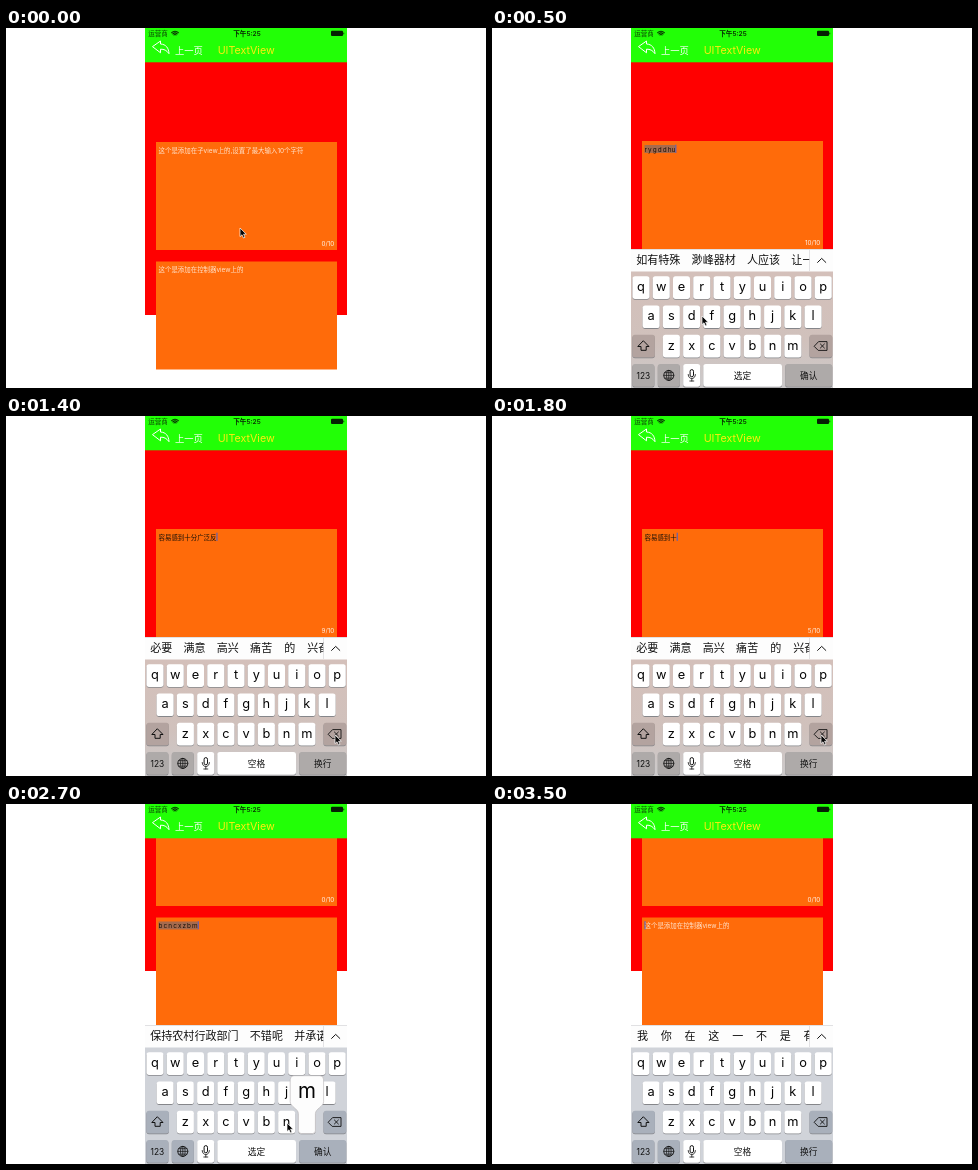
An HTML page for the animation above (3600 ms loop, 480 px wide and 360 px high).

```html
<!DOCTYPE html>
<html lang="zh-CN">
<head>
<meta charset="utf-8">
<title>UITextView</title>
<style>
html, body { margin: 0; width: 100%; height: 100%; overflow: hidden; background: #fff; }
svg { display: block; width: 480px; height: 360px; }
text { font-family: Inter, "Noto Sans CJK SC", "Noto Sans CJK", sans-serif; white-space: pre; }
</style>
</head>
<body>
<svg id="stage" viewBox="0 0 480 360">
  <defs>
    <clipPath id="phone"><rect x="139" width="202" height="360"/></clipPath>
    <clipPath id="bar"><rect x="139" y="221" width="178.5" height="23"/></clipPath>
    <linearGradient id="warm" x2="0" y2="1">
      <stop offset="0" stop-color="#d4c0ba"/>
      <stop offset=".6" stop-color="#d0c1bc"/>
      <stop offset="1" stop-color="#cccacb"/>
    </linearGradient>
  </defs>
</svg>
<script>
const NS = 'http://www.w3.org/2000/svg';
const stage = document.getElementById('stage');

function add(parent, tag, attrs = {}, content) {
  const el = document.createElementNS(NS, tag);
  set(el, attrs);
  if (content !== undefined) el.textContent = content;
  parent.append(el);
  return el;
}
function set(el, attrs) {
  for (const name in attrs) el.setAttribute(name, attrs[name]);
}
const group = (parent, attrs) => add(parent, 'g', attrs);
const rect = (parent, x, y, width, height, fill, rx = 0) =>
  add(parent, 'rect', { x, y, width, height, fill, rx });
const label = (parent, x, y, size, fill, content, anchor = 'start') =>
  add(parent, 'text', { x, y, 'font-size': size, fill, 'text-anchor': anchor }, content);
const line = (parent, d, stroke = '#111', width = 1) =>
  add(parent, 'path', { d, fill: 'none', stroke, 'stroke-width': width,
    'stroke-linecap': 'round', 'stroke-linejoin': 'round' });
const show = (el, on) => set(el, { visibility: on ? 'visible' : 'hidden' });

const phone = group(stage, { 'clip-path': 'url(#phone)' });

// Page content: red panel and two text views
const page = group(phone);
rect(page, 139, 34, 202, 253, '#ff0000');

function makeField(y, hint) {
  rect(page, 150, y, 181, 108, '#ff6b0a');
  const mark = rect(page, 152, y + 4, 0, 8, 'rgba(70,105,150,.48)');
  const placeholder = label(page, 152.5, y + 10.6, 6.45, '#ffe5d0', hint);
  const typed = label(page, 152.5, y + 10.6, 6.45, '#161008', '');
  const caret = rect(page, 152, y + 3.7, 1, 8.2, '#3f61d8');
  return { mark, placeholder, typed, caret };
}
const fields = [
  makeField(114, '这个是添加在子view上的,设置了最大输入10个字符'),
  makeField(233.5, '这个是添加在控制器view上的')
];
const counter = label(page, 328.3, 217.7, 6.3, '#fff0e4', '', 'end');

function fillField(field, text, marked, active) {
  field.typed.textContent = text;
  const start = text ? field.typed.getComputedTextLength() : 0;
  field.typed.textContent = text + marked;
  const end = text + marked ? field.typed.getComputedTextLength() : 0;
  set(field.mark, { x: 152.5 + start, width: end - start });
  set(field.caret, { x: 152.5 + end });
  show(field.caret, active);
  show(field.placeholder, !text && !marked);
}

// Navigation bar
rect(phone, 139, 0, 202, 34.3, '#22ff06');
label(phone, 142.3, 8, 6.5, '#0a3a05', '运营商');
for (const r of [1.4, 3, 4.6]) {
  const k = r * .72;
  line(phone, `M${169 - k} ${8 - k}A${r} ${r} 0 0 1 ${169 + k} ${8 - k}`, '#082c04', 1.1);
}
set(label(phone, 241, 8, 6.6, '#082c04', '下午5:25', 'middle'), { 'font-weight': 600 });
rect(phone, 325, 2.8, 12, 5.2, '#052003', 1);
rect(phone, 337.4, 4.4, .8, 2, '#052003', .4);
line(phone, 'M146.8 18.4L154.5 13V16C160 16.3 162.7 20 163 25.7C160.7 22.3 158 21.1 154.5 21.2V24.4Z', '#fff', 1);
set(label(phone, 169, 26, 9.3, '#fff', '上一页'), { 'font-weight': 300 });
label(phone, 240.2, 26.1, 10.7, '#ffec10', 'UITextView', 'middle');

// Keyboard
const board = group(phone);
const backdrop = rect(board, 139, 243, 202, 117, '#d0d3d9');
rect(board, 139, 221, 202, 22.5, '#fdfdfd');
rect(board, 139, 221, 202, .6, '#cfcfd2');
const words = group(board, { 'clip-path': 'url(#bar)' });
rect(board, 317.3, 222, .6, 21, '#d0d0d3');
line(board, 'M325.6 234.4L329.7 230.4L333.8 234.4');

const darkKeys = [];
function key(x, y, width, dark) {
  rect(board, x, y + .8, width, 22.7, '#85868a', 2.6);
  const face = rect(board, x, y, width, 22.7, '#fff', 2.6);
  if (dark) darkKeys.push(face);
}

const keys = {};
[['qwertyuiop', 149, 248.2], ['asdfghjkl', 159.1, 277.4], ['zxcvbnm', 179.4, 306.7]]
  .forEach(([letters, x, y]) => [...letters].forEach((ch, i) => {
    const cx = x + i * 20.25;
    keys[ch] = { cx, y };
    key(cx - 8.5, y, 17, false);
    label(board, cx, y + 15, 12.8, '#050505', ch, 'middle');
  }));

key(140.4, 306.7, 22.5, true);
line(board, 'M151.6 313L157 318.5H154.2V322.3H149V318.5H146.2Z');
key(317.5, 306.7, 22.7, true);
line(board, 'M322.4 318L326.6 313.6H335V322.4H326.6ZM328.4 316L332.4 320M332.4 316L328.4 320', '#111', .9);

key(140.4, 336, 22, true);
label(board, 151.4, 350.7, 8.4, '#111', '123', 'middle');
key(165.8, 336, 22, true);
add(board, 'circle', { cx: 176.8, cy: 347.4, r: 5, fill: 'none', stroke: '#111', 'stroke-width': .9 });
add(board, 'ellipse', { cx: 176.8, cy: 347.4, rx: 2.3, ry: 5, fill: 'none', stroke: '#111', 'stroke-width': .7 });
line(board, 'M171.8 347.4H181.8M176.8 342.4V352.4M172.7 344.7H180.9M172.7 350.1H180.9', '#111', .7);
key(191.2, 336, 17, false);
rect(board, 198.1, 341.6, 3.4, 7.2, 'none', 1.7).setAttribute('stroke', '#111');
line(board, 'M196.2 346.5C196.2 352 203.4 352 203.4 346.5M199.8 350.7V353M197.8 353H201.8', '#111', .8);
key(211.3, 336, 78.7, false);
const spaceLabel = label(board, 250.4, 350.7, 8.7, '#111', '', 'middle');
key(293.2, 336, 47, true);
const enterLabel = label(board, 316.7, 350.7, 8.7, '#111', '', 'middle');

// Enlarged key; its origin is the top centre of the pressed key
const bubble = group(board);
add(bubble, 'path', {
  d: 'M-13-35H13Q16.7-35 16.7-31V-9C16.7-4 8.5-2 8.5 3V20Q8.5 22.8 5.7 22.8H-5.7Q-8.5 22.8-8.5 20V3C-8.5-2-16.7-4-16.7-9V-31Q-16.7-35-13-35Z',
  fill: '#fdfdfd', stroke: '#b4b1b2', 'stroke-width': .6
});
const bubbleText = label(bubble, 0, -13, 20.5, '#050505', '', 'middle');

const pointer = add(stage, 'path', {
  d: 'M0 0V8.6L2 6.8L3.5 10L5 9.3L3.6 6.2H6.3Z',
  fill: '#050505', stroke: '#fff', 'stroke-width': .7
});

const PICKS = {
  start: '我 你 在 这 一 不 是 有',
  r: '人 让 如 日 入 热 肉 任',
  ryg: '如有 容易 任意 人员 人一个 日用',
  ryd: '容易 任意 如有的 人应 让一',
  full: '如有特殊 渺峰器材 人应该 让一',
  feel: '必要 满意 高兴 痛苦 的 兴奋',
  sf: '是否 身份 十分 省份 释放 师傅',
  f: '发 分 放 风 份 饭 翻 副',
  fg: '法国 反感 风格 覆盖 分管 飞过',
  bc: '不错 保持 报仇 版次 补充 编程',
  bcn: '保持农村 不错呢 并承诺 不曾',
  bcm: '保持农村行政部门 不错呢 并承诺'
};

const LONG = '容易感到十分广泛反感';
const VILLAGE = '保持农村行政部门';
const cut = (text, n) => text.slice(0, n);

// One row per 100 ms: active view, text, composing, picks, pointer x, y, pressed key
const STEPS = [
  [0, '', '', 'start', 234, 200],
  [1, '', '', 'start', 234, 200],
  [1, '', 'r', 'r', 211, 260, 'r'],
  [1, '', 'r y g', 'ryg', 239, 288],
  [1, '', 'r y g d d', 'ryd', 201, 288, 'd'],
  [1, '', 'r y g d d hu', 'full', 210, 288],
  [1, cut(LONG, 4), '', 'feel', 196, 232],
  [1, cut(LONG, 4), 's f', 'sf', 219, 288],
  [1, cut(LONG, 8), '', 'feel', 204, 234],
  [1, cut(LONG, 8), 'f', 'f', 240, 291, 'g'],
  [1, cut(LONG, 8), 'f g', 'fg', 240, 291],
  [1, LONG, '', 'feel', 187, 233],
  [1, LONG, '', 'feel', 270, 286],
  ...[10, 9, 8, 7, 6, 5, 3, 1].map(n => [1, cut(LONG, n), '', 'feel', 329, 319]),
  [1, '', '', 'start', 329, 319],
  [0, '', '', 'start', 284, 316],
  [0, '', '', 'start', 262, 321],
  [2, '', '', 'start', 262, 321],
  [2, '', 'b c', 'bc', 220, 319],
  [2, '', 'b c n c x', 'bcn', 200, 319, 'x'],
  [2, '', 'b c n c x z b m', 'bcm', 281, 319, 'm'],
  [2, VILLAGE, '', 'feel', 190, 233],
  [2, VILLAGE, '', 'feel', 280, 290],
  ...[8, 7, 5, 3, 1].map(n => [2, cut(VILLAGE, n), '', 'feel', 329, 319]),
  [2, '', '', 'start']
];
const SCROLL = [0, -1, -120];

function layPicks(list) {
  words.replaceChildren();
  let x = 144.2;
  for (const word of list.split(' ')) {
    const width = Math.max(12.6, word.length * 11.05);
    label(words, x + width / 2, 236.3, 11.05, '#111', word, 'middle');
    x += width + 11.2;
  }
}

function render(step) {
  const [view, text, composing, picks, px, py, pressed] = STEPS[step];
  const marked = composing.replaceAll(' ', '\u2006');
  set(page, { transform: `translate(0 ${SCROLL[view]})` });
  fields.forEach((field, i) => {
    const active = view === i + 1;
    fillField(field, active ? text : '', active ? marked : '', active);
  });
  const count = view === 1 ? Math.min(10, text.length + marked.length) : 0;
  counter.textContent = `${count}/10`;

  set(board, { display: view ? 'inline' : 'none' });
  set(backdrop, { fill: view === 1 ? 'url(#warm)' : '#d0d3d9' });
  darkKeys.forEach((face, i) => set(face, {
    fill: view === 2 ? '#a9b0bb' : i < 2 ? '#b3a39f' : '#aeaaa9'
  }));
  layPicks(PICKS[picks]);
  spaceLabel.textContent = marked ? '选定' : '空格';
  enterLabel.textContent = marked ? '确认' : '换行';

  set(bubble, { display: pressed ? 'inline' : 'none' });
  if (pressed) {
    const { cx, y } = keys[pressed];
    set(bubble, { transform: `translate(${cx} ${y})` });
    bubbleText.textContent = pressed;
  }
  show(pointer, px !== undefined);
  if (px !== undefined) set(pointer, { transform: `translate(${px} ${py})` });
}

let shown = -1;
const began = performance.now();
function tick() {
  const step = Math.floor((performance.now() - began) / 100) % STEPS.length;
  if (step !== shown) render(shown = step);
  requestAnimationFrame(tick);
}
tick();
</script>
</body>
</html>
```
